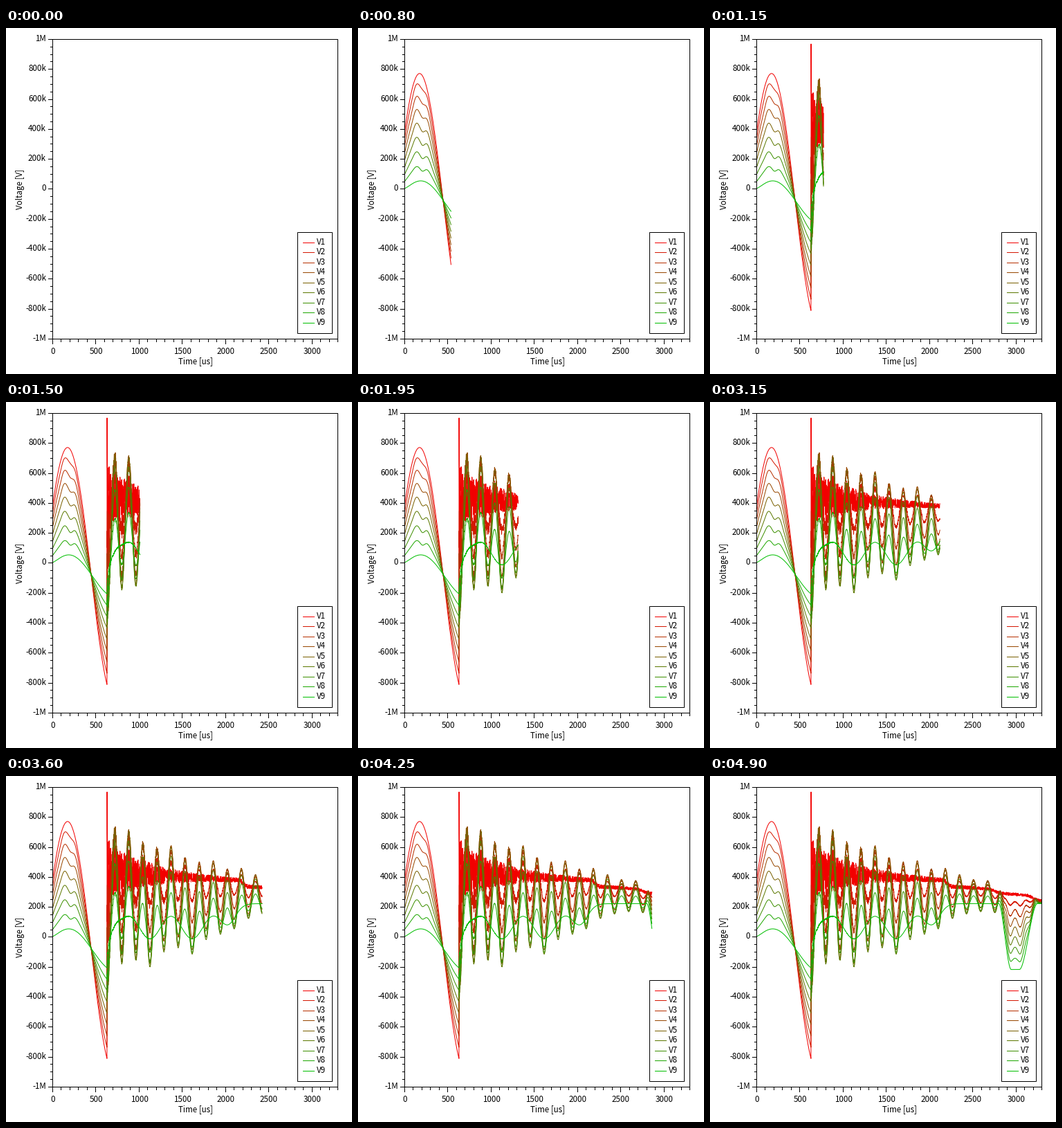
Write a matplotlib script that moves like this. It is 500 px wide and 500 px high and loops after 5000 ms.

```python
import numpy as np
import matplotlib.pyplot as plt
from matplotlib.animation import FuncAnimation
from matplotlib.patches import Rectangle

PX = 0.72                      # one pixel in points at 100 dpi
LEFT, RIGHT, TOP, BOTTOM = 67, 479, 15, 448
T_END, T_SWITCH, STEPS = 3300, 628, 98
FONT = dict(family="Noto Sans CJK JP", size=11.6 * PX, color="black")


def bump(t, centre, width):
    return np.exp(-((t - centre) / width) ** 2 / 2)


def step(t, centre, width):
    return 0.5 + 0.5 * np.tanh((t - centre) / width)


def ramp(t, start, stop):
    u = np.clip((t - start) / (stop - start), 0, 1)
    return u * u * (3 - 2 * u)


def before(s, t):
    """Voltage in kV ahead of the switch; s runs from 0 (V1) to 1 (V9)."""
    source = -74 + 842 * np.cos(0.0058 * (t - 172))
    end = -92 + 142 * np.cos(0.0058 * (t - 190)) + 28 * np.exp(-t / 60)
    near = 2.6 * np.sqrt(s) * (1 - s)
    far = 2.6 * s * np.sqrt(1 - s)
    ripple = near * (43 * bump(t, 130, 30) + 36 * bump(t, 268, 30))
    ripple -= far * 30 * bump(t, 205, 25)
    return (1 - s) * source + s * end + ripple


def source_after(t):
    drops = 40 * step(t, 2205, 30) + 25 * step(t, 2755, 45) + 35 * step(t, 3200, 60)
    return 430 - 0.035 * (t - T_SWITCH) - drops


def end_after(t):
    wave = 60 + 75 * np.cos(2 * np.pi * (t - 880) / 490)
    wave += 50 * bump(t, 730, 50) - 195 * np.exp((T_SWITCH - t) / 15)
    calm = step(t, 2080, 120)
    dip = ramp(t, 2800, 2946) - ramp(t, 3040, 3250)
    return (1 - calm) * wave + calm * 220 - 440 * dip


def after(s, t, rng):
    """Voltage in kV behind the switch: decaying swing plus reflections."""
    age = t - T_SWITCH
    mix = (1 - s) * source_after(t) + s * end_after(t)
    size = np.maximum(470 - 0.195 * age, 100) * (1 - ramp(t, 2780, 2880))
    swing = size * np.cos(2 * np.pi * (t - 718) / 163)
    late = 33 * ramp(t, 2850, 2910) * (1 - ramp(t, 3180, 3300))
    swing += late * np.cos(2 * np.pi * (t - 2990) / 120)
    rough = 10 + 150 * np.exp(-(age / 600) ** 1.3)
    rough *= 1 if s == 0 else 0.6 * (1 - s) ** 3
    rough += (1 - 0.9 * s) * (150 * np.exp(-age / 12) + 35 * np.exp(-age / 180))
    rough += 6 * np.exp(-age / 250)
    volts = mix + np.sin(np.pi * s) * swing + rough * rng.uniform(-1, 1, len(t))
    if s == 0:
        volts[0] = 965         # switching spike
    return volts


def to_x(t):
    return LEFT + 0.5 + t * (RIGHT - LEFT) / T_END


def to_y(kv):
    return (TOP + BOTTOM - 1) / 2 - kv * (BOTTOM - TOP) / 2000


# Whole-number coordinates land on whole pixels after line snapping.
fig = plt.figure(figsize=(5, 5), dpi=100, facecolor="white")
ax = fig.add_axes([0, 0, 1, 1])
ax.set_xlim(0, 500)
ax.set_ylim(499, -1)
ax.axis("off")


def stroke(xs, ys, color="black", z=4):
    return ax.plot(xs, ys, color=color, lw=PX, zorder=z)[0]


def label(x, y, text, ha="center", **kw):
    ax.text(x, y, text, ha=ha, va="baseline", zorder=6, **FONT, **kw)


def frame(x0, y0, x1, y1, fill, z):
    ax.add_patch(Rectangle((x0, y0), x1 - x0, y1 - y0, lw=PX, ec="black",
                           fc=fill, zorder=z))


def volt_name(kv):
    if abs(kv) == 1000:
        return f"{kv // 1000}M"
    return f"{kv}k" if kv else "0"


def draw_axes():
    frame(LEFT, TOP, RIGHT, BOTTOM, "none", 4)
    for kv in range(-1000, 1001, 50):
        y, major = int(to_y(kv) + 0.9), kv % 200 == 0
        stroke([LEFT - (6 if major else 3), LEFT], [y, y])
        if major:
            label(58, y + 3, volt_name(kv), "right")
    for t in range(0, T_END + 1, 100):
        x, major = round(to_x(t) - 0.5), t % 500 == 0
        stroke([x, x], [BOTTOM, BOTTOM + (7 if major else 4)])
        if major:
            label(x + 1, 470, str(t))
    label(274, 484, "Time [us]")
    label(24, 232, "Voltage [V]", rotation=90, rotation_mode="anchor")


def draw_legend(colors):
    frame(421, 294, 471, 440, "white", 5)
    for k, color in enumerate(colors):
        y = round(309 + 14.45 * k)
        stroke([429, 445], [y, y], color, 6)
        label(449, y + 3, f"V{k + 1}", "left")


rng = np.random.default_rng(7)
t0 = np.arange(0, T_SWITCH + 1, 4.0)
t1 = np.arange(T_SWITCH + 1, T_END + 1, 1.5)
shares = np.linspace(0, 1, 9)
colors = [(0.95 * (1 - s), 0.75 * s, 0) for s in shares]
times = np.r_[t0, t1]
xs = to_x(times)
traces = [to_y(np.r_[before(s, t0), after(s, t1, rng)]) for s in shares]
lines = [stroke([], [], c, 2) for c in colors]
draw_axes()
draw_legend(colors)


def update(i):
    now = T_END * min(i, STEPS) / STEPS
    n = np.searchsorted(times, now, side="right") if i else 0
    for line, ys in zip(lines, traces):
        line.set_data(xs[:n], ys[:n])
    return lines


anim = FuncAnimation(fig, update, frames=100, interval=50, repeat=True,
                     repeat_delay=0, blit=False)
plt.show()
```
